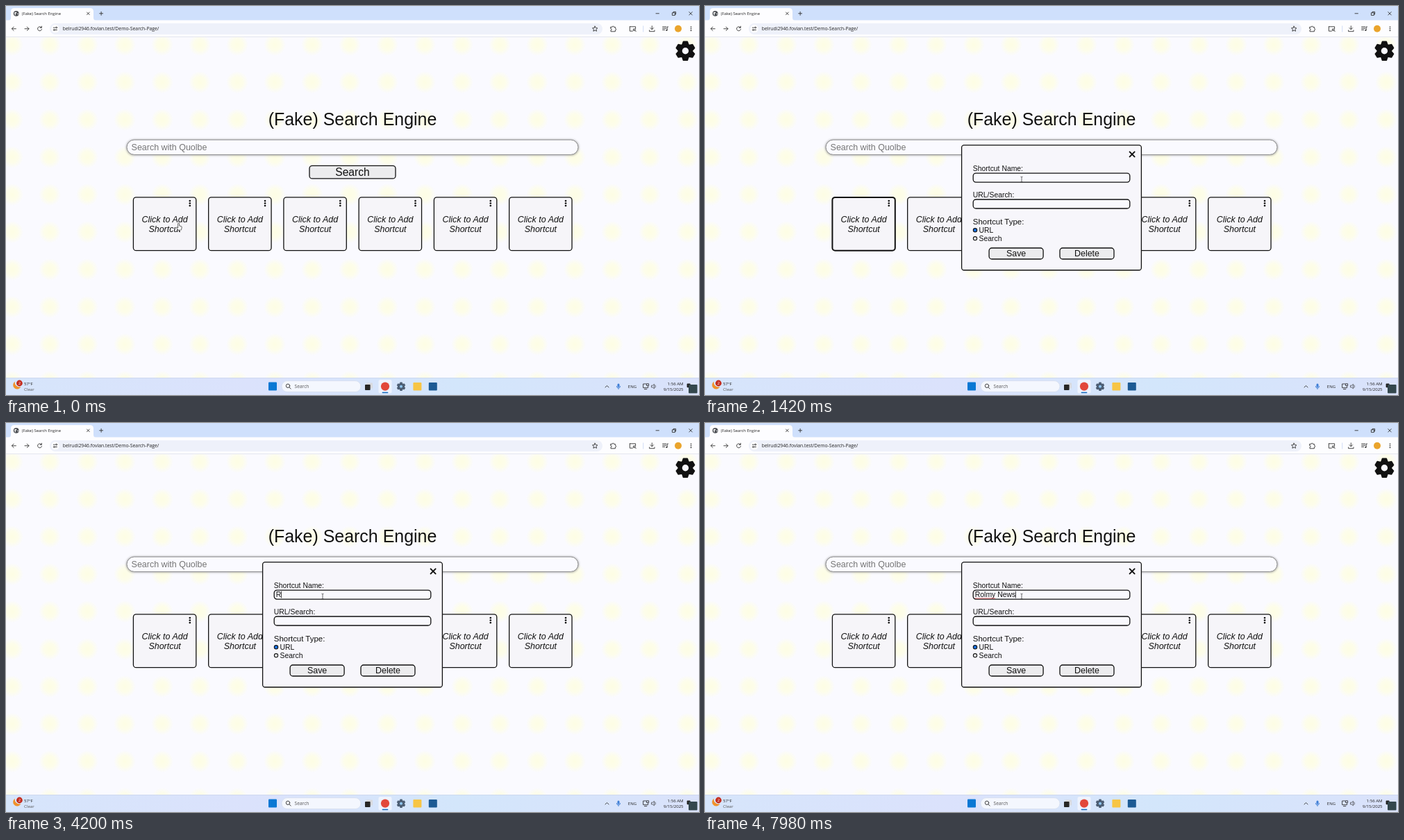
Recreate the animation shown at these times as an HTML page. Size 998 px wide and 561 px high, loop 8 s.

```html
<!DOCTYPE html>
<html lang="en">
<head>
<meta charset="utf-8">
<title>Search page</title>
<style>
html, body { margin: 0; width: 100%; height: 100%; overflow: hidden; background: #fafaff; }
svg { display: block; width: 100%; height: 100%; }
text { font-family: "Liberation Sans", Arial, sans-serif; white-space: pre; fill: #111; }
.ui { font-family: "Open Sans", "Noto Sans", sans-serif; fill: #222; }
.ic { fill: none; stroke: #333; stroke-width: .9; stroke-linecap: round; stroke-linejoin: round; }
.box { stroke: #111; stroke-width: 1.3; }
</style>
</head>
<body>
<svg id="stage" viewBox="0 0 998 561" preserveAspectRatio="none">
  <defs>
    <radialGradient id="spot">
      <stop offset="0" stop-color="#fdfde4"/>
      <stop offset=".5" stop-color="#fdfdea"/>
      <stop offset="1" stop-color="#fafaff"/>
    </radialGradient>
    <pattern id="spots" x="-18" y="29" width="54" height="54" patternUnits="userSpaceOnUse">
      <circle cx="27" cy="27" r="16" fill="url(#spot)"/>
    </pattern>
    <linearGradient id="bar">
      <stop offset="0" stop-color="#d6e5fb"/>
      <stop offset=".35" stop-color="#dbe2fc"/>
      <stop offset=".65" stop-color="#d3e6fb"/>
      <stop offset="1" stop-color="#dae2fb"/>
    </linearGradient>
    <filter id="glow" x="-5%" y="-40%" width="110%" height="180%">
      <feGaussianBlur stdDeviation="1.4"/>
    </filter>
  </defs>
  <g id="page"></g>
  <g id="chrome"></g>
  <g id="modal"></g>
  <g id="taskbar"></g>
  <g id="pointer"></g>
</svg>
<script>
const $ = id => document.getElementById(id);
const LOOP = 8000;

const rect = (x, y, w, h, r, fill, extra = '') =>
  `<rect x="${x}" y="${y}" width="${w}" height="${h}" rx="${r}" fill="${fill}" ${extra}/>`;
const box = (x, y, w, h, r, fill, extra = '') => rect(x, y, w, h, r, fill, `class="box" ${extra}`);
const circle = (x, y, r, fill, extra = '') => `<circle cx="${x}" cy="${y}" r="${r}" fill="${fill}" ${extra}/>`;
const label = (x, y, size, str, extra = '') => `<text x="${x}" y="${y}" font-size="${size}" ${extra}>${str}</text>`;
const mid = (x, y, size, str, extra = '') => label(x, y, size, str, `text-anchor="middle" ${extra}`);
const ui = (x, y, size, str, extra = '') => label(x, y, size, str, `class="ui" ${extra}`);
const icon = (d, extra = '') => `<path class="ic" d="${d}" ${extra}/>`;
const dots = (x, y, gap, r) => [-1, 0, 1].map(i => circle(x, y + i * gap, r, '#111')).join('');

function gear(x, y, scale, fill, hole) {
  const teeth = [0, 1, 2, 3, 4, 5].map(i =>
    `<path d="M-5.6 -8 L-3.7 -13.6 Q-3.5 -14.3 -2.8 -14.3 H2.8 Q3.5 -14.3 3.7 -13.6 L5.6 -8Z" transform="rotate(${i * 60})"/>`).join('');
  return `<g transform="translate(${x} ${y}) scale(${scale})" fill="${fill}">${teeth}<circle r="10.6"/>` +
    circle(0, 0, 4.7, hole) + '</g>';
}

function card(i) {
  const x = 183.4 + i * 108.25, c = x + 45.2;
  return box(x, 275.9, 90.4, 76.8, 4, '#f6f5f9', i ? '' : 'id="first"') + dots(x + 81.4, 284.5, 3.5, 1.35) +
    mid(c, 312, 12.48, 'Click to Add', 'font-style="italic"') +
    mid(c, 326, 12.48, 'Shortcut', 'font-style="italic"');
}

$('page').innerHTML =
  rect(0, 44, 998, 493, 0, '#fafaff') + rect(0, 44, 998, 493, 0, 'url(#spots)') +
  gear(978.4, 64.8, 1, '#111', '#fafaff') +
  mid(499, 172, 24.96, '(Fake) Search Engine') +
  rect(173, 192.5, 652, 23, 11.5, '#777', 'filter="url(#glow)" opacity=".6"') +
  rect(174, 193, 650, 21.4, 10.7, '#fafaff', 'stroke="#8c8c8c" stroke-width="1"') +
  label(180.6, 208, 12.48, 'Search with Quolbe', 'style="fill:#757575"') +
  box(437, 230.3, 124, 18.6, 4, '#ececee') + mid(499, 245, 15.6, 'Search') +
  [0, 1, 2, 3, 4, 5].map(card).join('');

$('chrome').innerHTML =
  rect(0, 0, 998, 30, 0, '#cfe0fc') +
  rect(0, 20.5, 998, 24, 0, '#fdfdff') + rect(0, 44, 998, .7, 0, '#dcdfe8') +
  `<path d="M3 21 Q7 21 7 17 V8 Q7 3 12 3 H121 Q126 3 126 8 V17 Q126 21 130 21Z" fill="#fdfdff"/>` +
  circle(14.7, 10.8, 3.9, '#4a4d52') +
  '<path d="M12 9.5 l2.5-1 l1 1.6 l-2 1 l.6 2 l-1.2 .3z M16 11 l2-.6 l-.6 2.2z" fill="#fff"/>' +
  ui(22.8, 13, 5.9, '(Fake) Search Engine') +
  icon('M116.6 9 l3.6 3.6 m0 -3.6 l-3.6 3.6') +
  icon('M134.6 10.8 h5 m-2.5 -2.5 v5') +
  icon('M936 10.8 h4.4') +
  icon('M959.8 9.8 h3.6 v3.6 h-3.6z M961 9.6 v-1.2 h3.6 v3.6 h-1') +
  icon('M983.8 8.6 l4.4 4.4 m0 -4.4 l-4.4 4.4') +
  rect(63, 25, 796, 16, 8, '#eef1fa') +
  icon('M14.4 32.8 h-6 m2.7 -2.7 l-2.7 2.7 l2.7 2.7') +
  icon('M27 32.8 h6 m-2.7 -2.7 l2.7 2.7 l-2.7 2.7') +
  icon('M51 31 a3 3 0 1 0 .5 2.6 M51.3 29.2 v2.1 h-2.1') +
  circle(71, 32.8, 5.8, '#fdfdff') +
  icon('M68.4 31.2 h2 M73.4 34.5 h-2') + circle(72.5, 31.2, 1, 'none', 'class="ic"') +
  circle(69.4, 34.5, 1, 'none', 'class="ic"') +
  ui(81.8, 35.2, 6.82, 'belrudi2946.fovlan.test/Demo-Search-Page/') +
  icon('M848.2 29.2 l1.1 2.4 2.6.3 -1.9 1.8 .5 2.6 -2.3-1.3 -2.3 1.3 .5-2.6 -1.9-1.8 2.6-.3z') +
  icon('M871 30.4 h2 a1.2 1.2 0 0 1 2.4 0 h2 v2 a1.2 1.2 0 0 1 0 2.4 v2 h-6.4 v-2 a1.2 1.2 0 0 0 0-2.4z') +
  icon('M898.4 29.8 h8.2 v3 M898.4 29.8 v6.4 h4 M903.8 33.2 h2.2 v2.2 h-2.2z M906 35.4 l1.3 1.4') +
  rect(917.4, 28.5, .8, 9, 0, '#c6d5f2') +
  icon('M930.3 28.8 v5 m-2.3 -2.2 l2.3 2.3 l2.3 -2.3 M926.6 35 v1.7 h7.4 v-1.7') +
  icon('M945.6 30 h5.2 M945.6 32.2 h5.2 M945.6 34.4 h3 M952.2 34.8 v-4.8 h1.4') +
  circle(951.3, 35, 1.1, '#333') +
  circle(968, 32.8, 5, '#eaa42c') + dots(986.5, 32.8, 2.6, .8);

const button = (x, str) => box(x, 349, 78, 16, 4, '#ececee') + mid(x + 39, 361.2, 12.48, str);
$('modal').innerHTML =
  box(369.6, 200.6, 258.8, 180.4, 3.5, '#f7f6fb') +
  icon('M611.6 210.4 l7 7 m0 -7 l-7 7', 'style="stroke:#111;stroke-width:2"') +
  label(385.8, 238, 10.4, 'Shortcut Name:') + box(386.2, 241.1, 225.6, 13, 4, '#f9f9fe') +
  label(385.8, 276, 10.4, 'URL/Search:') + box(386.2, 279, 225.6, 13, 4, '#f9f9fe') +
  label(385.8, 314.8, 11.44, 'Shortcut Type:') +
  circle(389, 323.3, 2.7, '#1a73e8', 'stroke="#111" stroke-width="1.1"') + label(394.6, 327, 10.4, 'URL') +
  circle(389, 335.2, 2.6, '#fff', 'stroke="#111" stroke-width="1.1"') + label(394.6, 339, 10.4, 'Search') +
  button(409.1, 'Save') + button(511, 'Delete') +
  label(388.8, 251.2, 10.4, '', 'id="typed"') +
  '<path id="squiggle" d="M389 252.9 H418.2" stroke="#e0262b" stroke-width=".9" stroke-dasharray="1.4 .5"/>' +
  rect(0, 242.6, .8, 9.8, 0, '#111', 'id="caret"');

$('taskbar').innerHTML =
  rect(0, 536, 998, 25, 0, 'url(#bar)') + rect(0, 536, 998, .6, 0, '#c9d3e8') +
  '<path d="M13 541.4 A6 6 0 1 0 21.6 549 A6.4 6.4 0 0 1 13 541.4Z" fill="#f0922b"/>' +
  circle(19.4, 544, 4.4, '#c42b1c') + ui(19.4, 546.2, 6, '2', 'text-anchor="middle" style="fill:#fff"') +
  ui(26, 546.8, 6.1, '57°F') + ui(26, 555, 6.1, 'Clear', 'style="fill:#555"') +
  rect(378, 542.6, 12, 12, 1, '#0a78d4') +
  rect(397, 540.6, 114, 16, 8, '#f4f7fe', 'stroke="#cfd8ea" stroke-width=".6"') +
  circle(406, 547.8, 2.7, 'none', 'class="ic"') + icon('M408 549.9 l2.2 2.2') +
  ui(415.6, 551, 6.6, 'Search', 'style="fill:#555"') +
  rect(519, 543.6, 9, 8, .8, '#d8dadf') + rect(517, 546, 7.6, 8, .8, '#262626') +
  rect(536.5, 539, 19, 19.5, 2.5, '#eef3fe') + circle(546, 548.6, 6.1, '#e2483a') +
  rect(541.6, 556.7, 8.8, 1.5, .7, '#0f67bd') +
  gear(569, 548.8, .44, '#4d5e74', '#8fc4ee') +
  rect(586.4, 543, 12, 11.4, 1, '#f7c544') +
  rect(608.8, 543, 12, 11.6, 1, '#1c5a94') +
  icon('M863 550 l2.5 -2.5 l2.5 2.5') +
  rect(880.5, 544.4, 3, 5.4, 1.5, '#3f7fd6') +
  icon('M879.4 548.4 a2.6 2.6 0 0 0 5.2 0 M882 551 v1.6', 'style="stroke:#3f7fd6"') +
  ui(895.8, 551, 6, 'ENG') +
  icon('M922 545 h-4.4 v5.6 h7 v-2 M919.4 552.6 h3.4 M923 544.8 h2.6 v2.8 h-2.6z') +
  icon('M930 547.2 h1.4 l2 -1.8 v6.4 l-2 -1.8 h-1.4z M935 546.8 q1.3 1.8 0 3.6', 'style="stroke-width:.7"') +
  ui(975.6, 546.8, 6.1, '1:56 AM', 'text-anchor="end"') +
  ui(975.6, 555, 6.05, '9/15/2025', 'text-anchor="end"') +
  rect(980.6, 544.6, 5, 5.6, 1, '#222') +
  rect(983, 546, 12.6, 12.4, 1, '#34474d');

const cursors = {
  hand: '<path d="M-1 .6 Q0 -.6 1 .6 V4 L3.6 4.6 Q4.7 5 4.6 6 L4 9.4 Q3.9 10.2 3 10.2 H-.2 L-3.4 7 Q-3.6 5.8 -2.4 6 L-1 7Z" fill="#fff" stroke="#222" stroke-width=".7"/>',
  arrow: '<path d="M0 0 V8.6 L2 6.8 L3.4 9.8 L4.8 9.2 L3.4 6.3 H6.1Z" fill="#fff" stroke="#222" stroke-width=".7"/>',
  beam: '<path d="M-1.5 -3.8 Q0 -3.8 0 -3 V3 Q0 3.8 -1.5 3.8 M1.5 -3.8 Q0 -3.8 0 -3 M0 3 Q0 3.8 1.5 3.8" fill="none" stroke="#444" stroke-width=".8"/>'
};
$('pointer').innerHTML = Object.entries(cursors).map(([k, d]) => `<g id="${k}">${d}</g>`).join('');

const PRESS = 280, OPEN = 540, FOCUS = 1900, SPELL = 6000;
const NAME = 'Rolmy News';
const keyTimes = [4050, 4800, 4960, 5140, 5320, 5560, 6700, 7320, 7500, 7700];
const path = [[0, 248.6, 313], [580, 248.6, 313], [1000, 431.4, 301], [1420, 456, 250], [LOOP, 456, 250]];

function pointerAt(t) {
  const i = path.findIndex((p, k) => t < path[k + 1][0]);
  const [t0, x0, y0] = path[i], [t1, x1, y1] = path[i + 1];
  const u = (t - t0) / (t1 - t0), e = u * u * (3 - 2 * u);
  return [x0 + (x1 - x0) * e, y0 + (y1 - y0) * e];
}

function pointerKind(x, y, open) {
  if (open && x > 369) return y > 241 && y < 254 || y > 279 && y < 292 ? 'beam' : 'arrow';
  return y > 276 && y < 353 && (x - 183.4) % 108.25 < 90.4 ? 'hand' : 'arrow';
}

const show = (id, on) => $(id).setAttribute('visibility', on ? 'inherit' : 'hidden');

function draw(t) {
  const open = t >= OPEN;
  $('modal').setAttribute('visibility', open ? 'visible' : 'hidden');
  $('first').style.strokeWidth = t >= PRESS && t < FOCUS ? 2 : 1.3;

  const keys = keyTimes.filter(k => k <= t);
  $('typed').textContent = NAME.slice(0, keys.length);
  show('squiggle', t >= SPELL);

  const since = t - (keys.length ? keys[keys.length - 1] : FOCUS);
  show('caret', since >= 0 && since % 1000 < 500);
  const width = keys.length ? $('typed').getComputedTextLength() : 0;
  $('caret').setAttribute('x', 388.6 + width);

  const [x, y] = pointerAt(t), kind = pointerKind(x, y, open);
  $('pointer').setAttribute('transform', `translate(${x} ${y})`);
  for (const k in cursors) show(k, k === kind);
}

const start = performance.now();
function tick() {
  draw((performance.now() - start) % LOOP);
  requestAnimationFrame(tick);
}
tick();
</script>
</body>
</html>
```
